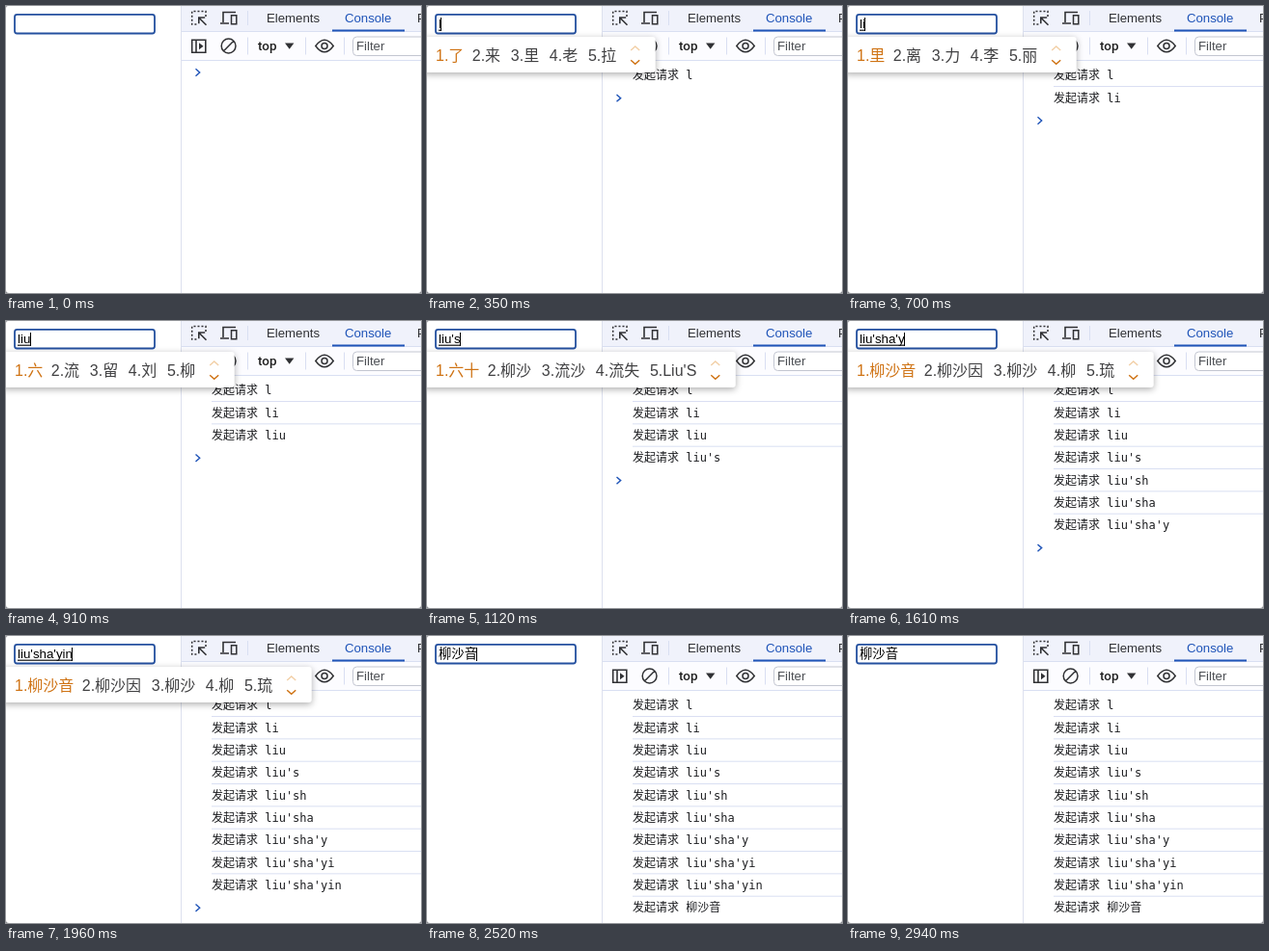
Recreate the animation shown at these times as an HTML page with a canvas. Size 430 px wide and 298 px high, loop 3150 ms.

```html
<!DOCTYPE html>
<html lang="zh">
<head>
<meta charset="utf-8">
<title>Console input</title>
<style>
html, body { margin: 0; width: 430px; height: 298px; overflow: hidden; background: #fff; }
canvas { display: block; width: 430px; height: 298px; }
</style>
</head>
<body>
<canvas id="stage" width="430" height="298"></canvas>
<script>
const ctx = document.getElementById('stage').getContext('2d');
const LOOP = 3150, STEP = 70;
const CJK = '"Noto Sans CJK SC", "Noto Sans CJK", "Noto Sans CJK JP", sans-serif';
const SANS = '"Liberation Sans", Arial, ' + CJK;
const MONO = '"DejaVu Sans Mono", "Noto Sans Mono", ' + CJK.replace('sans-serif', 'monospace');
const INK = '#303134', BLUE = '#1f54b8', RULE = '#d9dff2', BAR = '#f0f2fb';
const COMMIT = 2310, BLINK = 2940;
const NAME = '柳沙音';

// when each keystroke lands, the composed text, and the candidates it brings up
const KEYS = [
  [280, 'l', '了 来 里 老 拉'],
  [630, 'li', '里 离 力 李 丽'],
  [840, 'liu', '六 流 留 刘 柳'],
  [1050, "liu's", "六十 柳沙 流沙 流失 Liu'S"],
  [1260, "liu'sh", '六十 柳沙 流水 流失 柳树'],
  [1400, "liu'sha", '柳沙 流沙 刘 柳 琉'],
  [1540, "liu'sha'y", '柳沙音 柳沙因 柳沙 柳 琉'],
  [1680, "liu'sha'yi", '柳沙音 柳沙因 柳沙 柳 琉'],
  [1820, "liu'sha'yin", '柳沙音 柳沙因 柳沙 柳 琉']
];

function text(str, x, y, font, color) {
  ctx.font = font;
  ctx.fillStyle = color;
  ctx.fillText(str, x, y);
  return ctx.measureText(str).width;
}

function rect(x, y, w, h, color) {
  ctx.fillStyle = color;
  ctx.fillRect(x, y, w, h);
}

function stroke(path, color, width) {
  ctx.strokeStyle = color;
  ctx.lineWidth = width;
  ctx.stroke(new Path2D(path));
}

function fill(path, color) {
  ctx.fillStyle = color;
  ctx.fill(new Path2D(path));
}

function box(x, y, w, h, r) {
  ctx.beginPath();
  ctx.roundRect(x, y, w, h, r);
}

function drawTabs() {
  rect(182, 0, 248, 26, BAR);
  rect(182, 26, 248, 1, RULE);
  rect(182, 27, 248, 29, '#fcfcff');
  rect(182, 56, 248, 1, RULE);
  rect(181, 0, 1, 298, '#dde1ee');

  // element picker
  ctx.setLineDash([2, 2]);
  stroke('M207 11V5.5H192.7V19H198', INK, 1.5);
  ctx.setLineDash([]);
  stroke('M207.5 19.7L200 12.2M199.8 18.2V12H206.2', INK, 1.6);
  // device toolbar
  stroke('M238 6.5H225V17M222 18H231', INK, 1.6);
  stroke('M233.5 9.8H238.8V18.8H233.5Z', INK, 1.5);
  rect(250, 5, 1, 15, RULE);

  const font = '13.2px ' + SANS;
  text('Elements', 270, 17, font, INK);
  text('Console', 351, 17, font, BLUE);
  text('Performance', 426, 17, font, INK);
  rect(338, 24.5, 75, 2, BLUE);
}

function drawToolbar() {
  ctx.save();
  ctx.translate(0, -0.5);
  // sidebar toggle
  stroke('M192.7 35.7H206.8V48.8H192.7ZM197 35.7V48.8', INK, 1.6);
  fill('M200 38.7L204.6 42.2L200 45.7Z', INK);
  // clear
  stroke('M238 42A7.4 7.4 0 1 1 223.2 42A7.4 7.4 0 1 1 238 42M225.5 47.2L235.8 36.8', INK, 1.5);
  for (const x of [250, 310, 350]) rect(x, 33, 1, 18, RULE);

  text('top', 261, 46.5, '500 13.4px Roboto, ' + SANS, '#1f1f1f');
  fill('M289 39H298.4L293.7 45.3Z', INK);
  // live expression eye
  stroke('M320.8 42Q330 29.5 339.2 42Q330 54.5 320.8 42Z', INK, 1.5);
  stroke('M333 42A3 3 0 1 1 327 42A3 3 0 1 1 333 42', INK, 1.5);

  box(359.5, 32.5, 90, 19.5, 4);
  ctx.fillStyle = '#fff';
  ctx.fill();
  ctx.strokeStyle = '#c3c6d1';
  ctx.lineWidth = 1;
  ctx.stroke();
  text('Filter', 363, 46.5, '13.2px ' + SANS, '#4c4f54');
  ctx.restore();
}

function drawLogs(logs) {
  const gap = 23.33;
  logs.forEach((value, i) => {
    text('发起请求 ' + value, 213, 76.2 + gap * i, '12px ' + MONO, '#1c1d20');
    if (i) rect(213, 59.7 + gap * i, 217, 1, RULE);
  });
  const y = logs.length ? 72.3 + gap * logs.length : 69;
  stroke(`M196.5 ${y - 3.7}L200.7 ${y}L196.5 ${y + 3.7}`, BLUE, 1.4);
}

function drawInput(value, composing, caret) {
  box(9, 8.9, 145, 19.6, 2.5);
  ctx.fillStyle = '#fff';
  ctx.fill();
  ctx.strokeStyle = '#24509f';
  ctx.lineWidth = 1.8;
  ctx.stroke();
  if (!value) return;
  const w = text(value, 12, 23, '13.333px ' + SANS, '#000');
  if (composing) rect(12, 24.6, w, 1.2, '#111');
  if (caret) rect(Math.round(11.5 + w), 12, 1, 14, '#000');
}

function drawPopup(list, alpha) {
  const font = '16px ' + SANS;
  ctx.font = font;
  const items = list.split(' ').map((word, i) => `${i + 1}.${word}`);
  const xs = [];
  let end = 9;
  items.forEach((item, i) => {
    xs.push(end);
    end += ctx.measureText(item).width + (i ? 10.7 : 8.4);
  });
  end -= 10.7;

  ctx.save();
  ctx.globalAlpha = alpha;
  ctx.shadowColor = 'rgba(0,0,0,0.32)';
  ctx.shadowBlur = 7;
  ctx.shadowOffsetY = 2;
  box(-4, 32, end + 44.5, 37, 3);
  ctx.fillStyle = '#fff';
  ctx.fill();
  ctx.shadowColor = 'transparent';
  items.forEach((item, i) => text(item, xs[i], 57, font, i ? '#404042' : '#cf7314'));
  const x = end + 19.5;
  stroke(`M${x - 4.5} 46L${x} 42L${x + 4.5} 46`, '#f2cfa6', 1.4);
  stroke(`M${x - 4.5} 56.3L${x} 60.3L${x + 4.5} 56.3`, '#cf7314', 1.5);
  ctx.restore();
}

function drawCorners() {
  fill('M0 295Q0 298 3 298H0ZM430 295Q430 298 427 298H430ZM0 2Q0 0 2 0H0Z', '#85878c');
}

function draw(t) {
  const typed = KEYS.filter(k => t >= k[0]);
  const logs = KEYS.filter(k => t >= k[0] + STEP).map(k => k[1]);
  const done = t >= COMMIT;
  if (t >= COMMIT + STEP) logs.push(NAME);
  const value = done ? NAME : typed.length ? typed[typed.length - 1][1] : '';

  rect(0, 0, 430, 298, '#fff');
  drawTabs();
  drawToolbar();
  drawLogs(logs);
  drawInput(value, !done, t < BLINK);

  const shown = KEYS.filter(k => t >= k[0] + STEP).pop();
  const alpha = done ? Math.max(0, 0.7 - (t - COMMIT) / 300) : 1;
  if (shown && alpha > 0) drawPopup(shown[2], alpha);
  drawCorners();
}

const start = performance.now();
function frame() {
  const t = (performance.now() - start) % LOOP;
  draw(Math.floor(t / STEP) * STEP);
  requestAnimationFrame(frame);
}
frame();
</script>
</body>
</html>
```
